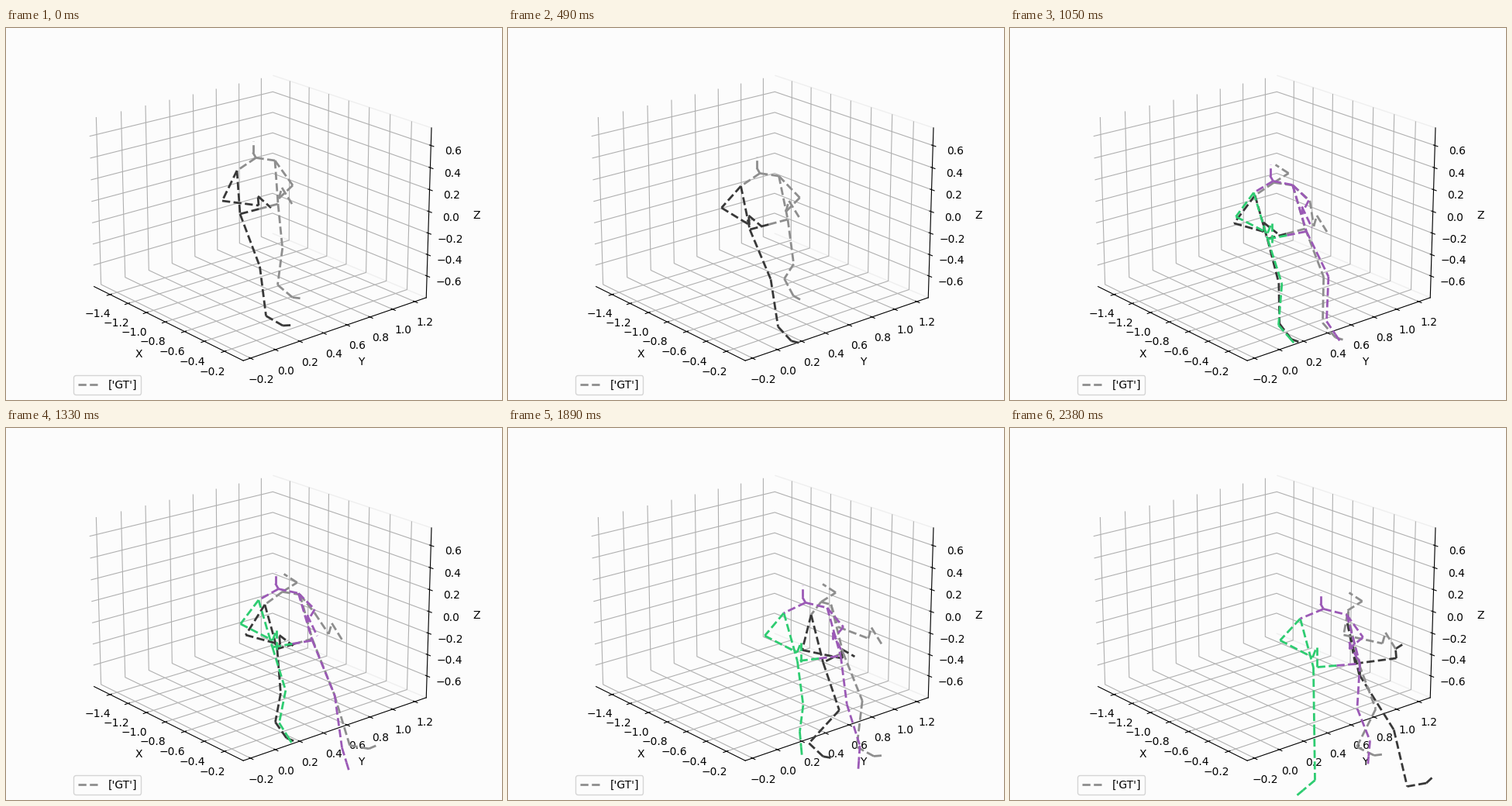
A matplotlib script that plays this animation: 640x480 px, repeating every 2.45 s.

```python
import numpy as np
import matplotlib.pyplot as plt
from matplotlib.animation import FuncAnimation
from matplotlib.lines import Line2D

FRAMES, STEP_MS = 35, 70
FORECAST_START = 10
PAPER = "#fcfcfc"
GRAY, DARK = "#8e8e8e", "#383838"
PURPLE, GREEN = "#9b59b6", "#2ecc71"

plt.rcParams.update({"figure.facecolor": PAPER, "axes.facecolor": PAPER,
                     "font.family": "DejaVu Sans", "font.size": 10})


# Motion tracks: functions of the step number t, in stage pixels

def fixed(*value):
    return lambda t: np.array(value, float)


def track(*rows):
    """Monotone cubic through rows of (t, values...)."""
    rows = np.array(rows, float)
    times, vals = rows[:, 0], rows[:, 1:]
    secant = np.diff(vals, axis=0) / np.diff(times)[:, None]
    a, b = secant[:-1], secant[1:]
    same = a * b > 0
    inner = np.where(same, 2 * a * b / np.where(same, a + b, 1), 0)
    slope = np.vstack([secant[:1], inner, secant[-1:]])

    def at(t):
        t = np.clip(t, times[0], times[-1])
        k = min(np.searchsorted(times, t, "right"), len(times) - 1) - 1
        span = times[k + 1] - times[k]
        u = (t - times[k]) / span
        return ((1 + 2 * u) * (1 - u) ** 2 * vals[k]
                + u * (1 - u) ** 2 * span * slope[k]
                + u * u * (3 - 2 * u) * vals[k + 1]
                + u * u * (u - 1) * span * slope[k + 1])
    return at


def branch(source, *rows):
    """Track that leaves another one just before the forecast starts."""
    t = FORECAST_START - 1
    return track((t, *source(t)), *rows)


def turning(t):
    """Half width of hips and shoulders while the body turns side-on."""
    turn = np.pi / 2 * np.clip((t - 14) / 20, 0, 1)
    return np.array([24.5 * np.cos(turn), -6.5])


def nodding(t):
    u = np.clip((t - 8) / 6, 0, 1)
    return u * u * (3 - 2 * u)


# Arms list upper arm, forearm, thumb and hand as bone vectors;
# legs give ankle x, ankle y, foot pitch in degrees and knee bend.
walker = {
    "pelvis": track((0, 326, 233), (7, 336, 253), (15, 356, 265),
                    (19, 372, 278), (24, 404, 289), (34, 450, 311)),
    "spine": track((0, -4, -56), (14, -16, -56), (34, -15, -66)),
    "half": turning,
    "nod": nodding,
    "foot": (25, 33),
    "arm_l": [
        track((0, 23, 32), (7, 27, 28), (15, 22, 20), (24, 14, 29),
              (34, -5, 28)),
        track((0, -18, 17), (7, -18, 18), (15, 5, 33), (24, 33, 17),
              (34, 50, 11)),
        fixed(4, -14), fixed(13, 21)],
    "arm_r": [
        track((0, -19, 39), (7, -25, 28), (15, -27, 36), (24, -18, 43),
              (34, 10, 52)),
        track((0, 47, 6), (7, 36, 22), (15, 39, 11), (24, 51, 14),
              (34, 53, -7)),
        fixed(-1, -12), track((0, 17, 15), (24, 18, 13), (34, 11, -7))],
    "leg_l": track((0, 350, 331, 40, 6), (7, 356, 323, 62, 11),
                   (15, 403, 380, 49, 12), (19, 443, 409, 10, 3),
                   (24, 450, 411, 29, 12), (34, 447, 411, 26, 23)),
    "leg_r": track((0, 335, 371, 30, 8), (7, 348, 385, 47, 8),
                   (19, 347, 379, 55, 6), (24, 352, 378, 58, 35),
                   (30, 445, 444, 18, 24), (34, 512, 462, -10, 13)),
}

forecast = {
    "pelvis": branch(walker["pelvis"], (15, 357, 267), (19, 369, 278),
                     (24, 391, 292), (34, 421, 306)),
    "spine": branch(walker["spine"], (15, -18, -60), (34, -17, -63)),
    "half": branch(turning, (15, 25, -5), (34, 30, -2.5)),
    "nod": lambda t: 0,
    "foot": (20, 0),
    "arm_l": [branch(walker["arm_l"][0], (15, 21, 20), (34, 21, 29)),
              branch(walker["arm_l"][1], (15, -9, 17), (34, -18, 15)),
              fixed(0, -9), fixed(13, 27)],
    "arm_r": [branch(walker["arm_r"][0], (15, -23, 31), (34, -26, 28)),
              branch(walker["arm_r"][1], (15, 41, 21), (34, 42, 22)),
              fixed(5, -13), fixed(0, 26)],
    "leg_l": branch(walker["leg_l"], (15, 408, 378, 56, 15),
                    (19, 433, 412, 73, 9), (24, 448, 411, 93, -2),
                    (34, 464, 403, 95, -11)),
    "leg_r": branch(walker["leg_r"], (15, 346, 383, 49, 11),
                    (19, 352, 380, 58, 12), (24, 368, 380, 69, 8),
                    (34, 393, 454, 140, 0)),
}


def chain(start, *steps):
    return np.cumsum([start, *steps], axis=0)


def polar(length, degrees):
    a = np.radians(degrees)
    return length * np.array([np.cos(a), np.sin(a)])


def leg_joints(hip, state, foot):
    """Hip, knee, ankle, foot and toe; the knee bows out from the leg line."""
    ankle, (pitch, bend) = state[:2], state[2:]
    size, curl = foot
    reach = np.hypot(*(ankle - hip))
    along = (ankle - hip) / reach
    across = np.array([along[1], -along[0]])
    knee = hip + max(0.53 * reach, 57) * along + bend * across
    return np.vstack([[hip, knee], chain(ankle, polar(size, pitch),
                                         polar(10, pitch - curl))])


def head_joints(chest, nod):
    """Chest, neck and head, from upright to bent forward."""
    upright = np.array([(-4, -7), (0, -15)])
    bowed = np.array([(19, -12), (-17, -11)])
    return chain(chest, *(upright + nod * (bowed - upright)))


def bones(body, t):
    """Bones of the right and the left side as lists of point pairs."""
    pelvis, half = body["pelvis"](t), body["half"](t)
    collar = pelvis + body["spine"](t)
    chest = collar + (0, -10)
    sides = []
    for name, sign in (("r", -1), ("l", 1)):
        hip, shoulder = pelvis + sign * half, collar + sign * half
        arm = chain(shoulder, *(bone(t) for bone in body["arm_" + name]))
        leg = leg_joints(hip, body["leg_" + name](t), body["foot"])
        side = [(pelvis, hip), (shoulder, hip)]
        for limb in (leg, arm):
            side += zip(limb[:-1], limb[1:])
        sides.append(side)
    head = head_joints(chest, body["nod"](t))
    sides[1] += [(chest, collar + half), (chest, collar - half),
                 *zip(head[:-1], head[1:])]
    return sides


fig = plt.figure(figsize=(6.4, 4.8), dpi=100)

# 3D room
room = fig.add_axes([0, 0, 1, 1], projection="3d")
room.view_init(elev=20, azim=-40)
reach = 0.75 * 25 / 24
centre = (-0.7995, 0.524, -0.0235)
room.set(**{f"{n}lim": (c - reach, c + reach) for n, c in zip("xyz", centre)})
room.set(xticks=np.arange(-7, 0) / 5, yticks=np.arange(-1, 7) / 5,
         zticks=np.arange(-3, 4) / 5, xlabel="X", ylabel="Y", zlabel="Z")
for axis, edge in ((room.xaxis, "none"), (room.yaxis, "#efefef"),
                   (room.zaxis, "none")):
    axis.pane.set_alpha(None)
    axis.pane.set_facecolor("none")
    axis.pane.set_edgecolor(edge)
room.legend(handles=[Line2D([], [], color=GRAY, lw=2, ls="--",
                            label="['GT']")], loc="lower left")

# Flat layer for the figures, whole numbers at pixel centres
stage = fig.add_axes([0, 0, 1, 1], label="stage")
stage.set_xlim(-0.5, 639.5)
stage.set_ylim(479.5, -0.5)
stage.axis("off")


def make_lines(body, *colors):
    return [[stage.plot([], [], "--", lw=2, color=color)[0] for _ in side]
            for side, color in zip(bones(body, FORECAST_START), colors)]


figures = [(walker, make_lines(walker, DARK, GRAY), 0),
           (forecast, make_lines(forecast, GREEN, PURPLE), FORECAST_START)]


def update(i):
    for body, sides, start in figures:
        for lines, pairs in zip(sides, bones(body, i)):
            for line, (a, b) in zip(lines, pairs):
                line.set_data([a[0], b[0]], [a[1], b[1]])
                line.set_visible(i >= start)


anim = FuncAnimation(fig, update, frames=FRAMES, interval=STEP_MS,
                     init_func=lambda: update(0), repeat=True, repeat_delay=0)
plt.show()
```
